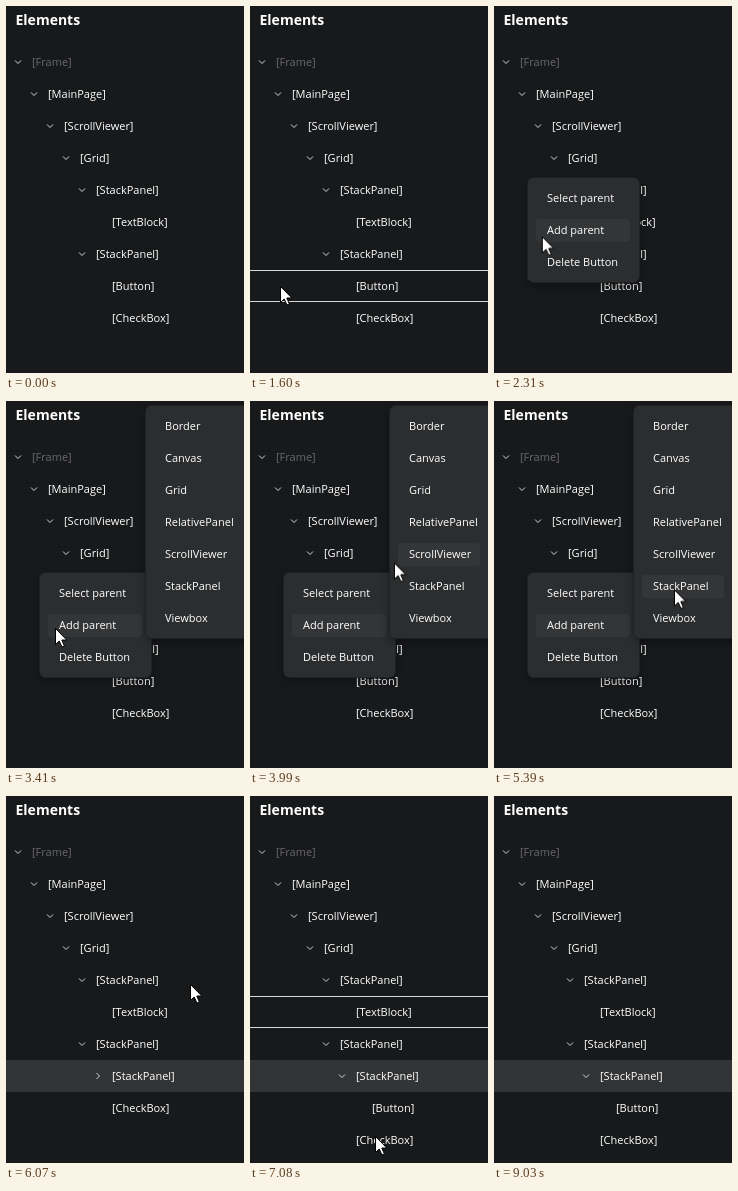
Recreate the animation shown at these times as an HTML page. Size 238 px wide and 367 px high, loop 9600 ms.

```html
<!DOCTYPE html>
<html lang="en">
<head>
<meta charset="utf-8">
<title>Elements tree</title>
<style>
  html, body { margin: 0; width: 100%; height: 100%; overflow: hidden; background: #18191b; }
  svg { display: block; width: 238px; height: 367px; font: 11px "Open Sans", "Noto Sans", sans-serif; fill: #fff; }
  .title { font-size: 14px; font-weight: 700; }
  .dim { fill: #69696b; }
  .chevron { fill: none; stroke: #d4d4d5; stroke-width: 1; }
  .line { fill: #d6d6d7; }
  .panel { fill: #2c2d2f; stroke: #202123; filter: drop-shadow(0 3px 4px rgba(0, 0, 0, .3)); }
  .hot { fill: #343537; }
  .arrow { fill: #fff; stroke: #000; stroke-width: 1; stroke-linejoin: round; }
</style>
</head>
<body>
<svg id="stage" viewBox="0 0 238 367"></svg>
<script>
const LOOP = 9600;
const AWAY = -99;
const stage = document.getElementById('stage');

function add(parent, tag, attrs = {}, text = '') {
  const el = document.createElementNS('http://www.w3.org/2000/svg', tag);
  for (const key in attrs) el.setAttribute(key, attrs[key]);
  el.textContent = text;
  parent.append(el);
  return el;
}

function play(el, frames) {
  const last = { ...frames[frames.length - 1], offset: 1 };
  el.animate([...frames, last], { duration: LOOP, iterations: Infinity }).startTime = 0 + startAt;
}

const startAt = document.timeline.currentTime || 0;

// Hard changes: steps are [time, value]
function hold(el, prop, steps, format = v => v) {
  play(el, steps.map(([t, v]) => ({ offset: t / LOOP, [prop]: format(v), easing: 'steps(1, end)' })));
}

function show(el, from, to) {
  const steps = [[0, from ? 'hidden' : 'visible']];
  if (from) steps.push([from, 'visible']);
  if (to) steps.push([to, 'hidden']);
  hold(el, 'visibility', steps);
}

const moveY = (el, steps) => hold(el, 'transform', steps, y => `translate(0px, ${y}px)`);

function node(parent, name, depth, y, state = '') {
  const x = 12 + depth * 16;
  const turn = state === 'closed' ? -90 : 0;
  if (state) add(parent, 'path', {
    class: 'chevron', d: 'M-3-1.5L0 1.5L3-1.5', transform: `translate(${x} ${y}) rotate(${turn})`
  });
  add(parent, 'text', { x: x + 14, y: y + 4, class: depth ? '' : 'dim' }, `[${name}]`);
}

function menu(box, names, textX, firstY, hotWidth, hotSteps) {
  const g = add(stage, 'g');
  add(g, 'rect', { class: 'panel', rx: 6, ...box });
  const hot = add(g, 'rect', { class: 'hot', x: textX - 11, y: -11, width: hotWidth, height: 23, rx: 3 });
  moveY(hot, hotSteps);
  names.forEach((name, i) => add(g, 'text', { x: textX, y: firstY + i * 32 + 4 }, name));
  return g;
}

// Tree
const selected = add(stage, 'rect', { y: 264, width: 238, height: 32, fill: '#333436' });
show(selected, 6070);

add(stage, 'text', { class: 'title', x: 9.5, y: 19 }, 'Elements');
[
  ['Frame', 0, 1], ['MainPage', 1, 1], ['ScrollViewer', 2, 1], ['Grid', 3, 1],
  ['StackPanel', 4, 1], ['TextBlock', 5, 0], ['StackPanel', 4, 1]
].forEach(([name, depth, open], i) => node(stage, name, depth, 56 + i * 32, open ? 'open' : ''));

const before = add(stage, 'g');
node(before, 'Button', 5, 280);
show(before, 0, 6070);

const closed = add(stage, 'g');
node(closed, 'StackPanel', 5, 280, 'closed');
show(closed, 6070, 6100);

const opened = add(stage, 'g');
node(opened, 'StackPanel', 5, 280, 'open');
node(opened, 'Button', 6, 312);
show(opened, 6100);

const check = add(stage, 'g');
node(check, 'CheckBox', 5, 0);
moveY(check, [[0, 312], [6100, 344]]);

// Row hover
const hover = add(stage, 'g');
for (const y of [0, 31]) add(hover, 'rect', { class: 'line', y, width: 238, height: 1 });
moveY(hover, [[0, AWAY], [800, 296], [960, 264], [2010, AWAY], [6260, 168], [6400, 200], [9030, AWAY]]);

// Menus
const context = menu(
  { x: 33.5, y: 171.5, width: 112, height: 105 },
  ['Select parent', 'Add parent', 'Delete Button'], 53, 192, 94,
  [[0, AWAY], [2100, 256], [2230, 224]]
);
show(context, 1620, 5910);

const parents = menu(
  { x: 139.5, y: 4.5, width: 120, height: 233 },
  ['Border', 'Canvas', 'Grid', 'RelativePanel', 'ScrollViewer', 'StackPanel', 'Viewbox'], 159, 25, 82,
  [[0, AWAY], [3850, 185], [3960, 153], [4120, 121], [4400, 89], [4890, 121], [5010, 153], [5130, 185]]
);
show(parents, 2690, 5910);

// Pointer: [time, x, y, easing to the next point]
const cursor = add(stage, 'path', {
  class: 'arrow', d: 'M.5.5V16.5L4.2 13L7 19L9.4 18L6.8 12H11.8Z'
});
const path = [
  [0, 165, 370], [630, 160, 365],
  [900, 85, 307, 'ease-out'], [1260, 30, 280],
  [1990, 30, 280, 'ease-in-out'], [2380, 49, 227],
  [3410, 49, 227, 'ease-in'], [3800, 128, 203], [4100, 153, 138, 'ease-out'], [4360, 159, 104],
  [4380, 159, 104, 'ease-out'], [4660, 176, 100, 'ease-in-out'], [5330, 181, 186],
  [5350, 180, 187, 'ease-in-out'], [5480, 180, 194],
  [5680, 180, 194, 'ease-in-out'], [5760, 184, 188],
  [6260, 184, 188, 'ease-in-out'], [7080, 125, 340],
  [7940, 125, 340, 'ease-in'], [8170, 88, 306, 'ease-out'], [8400, 70, 276],
  [8630, 72, 276, 'ease-in'], [8880, 178, 370]
];
play(cursor, path.map(([t, x, y, easing = 'linear']) => ({
  offset: t / LOOP, transform: `translate(${x}px, ${y}px)`, easing
})));
show(cursor, 630, 8880);
</script>
</body>
</html>
```
